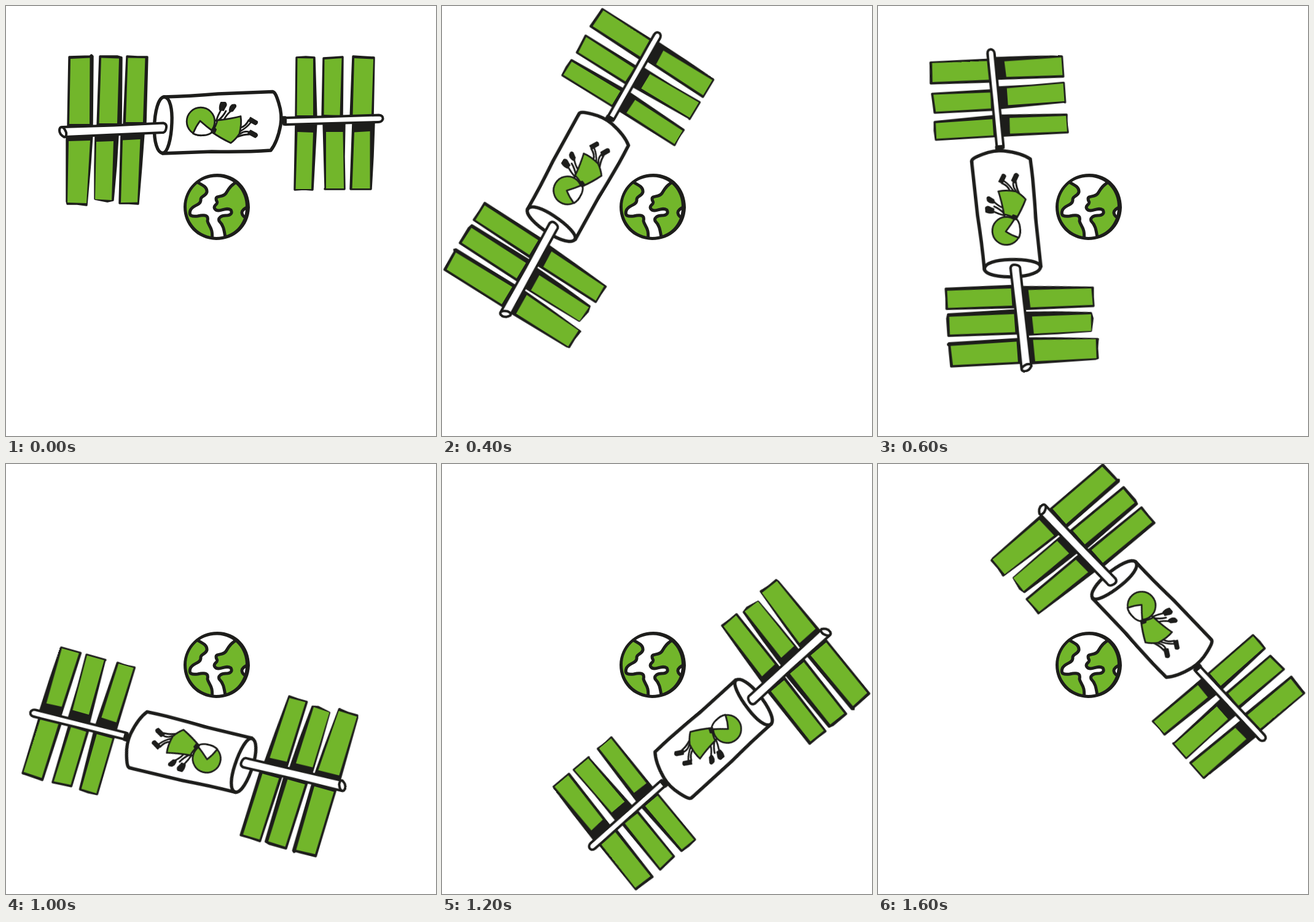
Animation, 700 px wide and 700 px high, one loop 1800 ms. Source, as an HTML page:

```html
<!DOCTYPE html>
<html lang="en">
<head>
<meta charset="utf-8">
<title>Space station in orbit</title>
<style>
  html, body { margin: 0; height: 100%; overflow: hidden; background: #fff; }
  svg { display: block; width: 100%; height: 100%; }
  .ink { fill: #1d1d1b; stroke: #1d1d1b; stroke-width: 3.4; stroke-linejoin: round; }
  .green { fill: #72b62b; }
  .white { fill: #fff; }
  .line { stroke: #1d1d1b; stroke-width: 5.4; stroke-linejoin: round; stroke-linecap: round; }
  .land { stroke-width: 5; }
  .rod { stroke-width: 4; }
  .thin { stroke-width: 2.8; }
  .small { stroke-width: 2; }
  .flat { stroke: none; }
  .none { fill: none; }
  #station {
    transform-origin: 351.5px 194.5px;
    animation: orbit 1.8s step-end infinite;
  }
  @keyframes orbit {
    0%     { transform: none; }
    11.11% { transform: translate(-74px, 19px) rotate(-25.7deg); }
    22.22% { transform: translate(-123.7px, 79.5px) rotate(-58.9deg); }
    33.33% { transform: translate(-138.5px, 136.7px) rotate(-94deg); }
    44.44% { transform: translate(-87.5px, 240px) rotate(-139.1deg); }
    55.55% { transform: translate(-56.3px, 269.5px) rotate(-164.3deg); }
    66.66% { transform: translate(82.2px, 254px) rotate(-220.1deg); }
    77.77% { transform: translate(164.3px, 190px) rotate(-258.5deg); }
    88.88% { transform: translate(95.6px, 66.3px) rotate(-311.5deg); }
  }
</style>
</head>
<body>
<svg viewBox="0 0 700 700">
  <defs>
    <clipPath id="disc"><circle cx="343" cy="327" r="52"/></clipPath>
  </defs>

  <g id="earth">
    <circle class="white" cx="343" cy="327" r="52"/>
    <g class="green line land" clip-path="url(#disc)">
      <path d="M309 285C317 291 328 293 327 303C325 310 316 309 317 317C316 325 303 324 300 333C297 342 303 343 312 342C325 339 330 341 328 350C330 359 338 361 335 382L270 382V285Z"/>
      <path d="M377 286C367 290 362 298 358 305C353 312 342 308 342 314C342 319 347 319 341 324C337 328 340 333 346 333C354 332 360 328 366 332C369 337 366 341 358 341C350 341 345 345 347 350C355 358 355 366 358 382H420V286Z"/>
      <path class="white" d="M396 326C387 330 383.500 333 384 337C384.500 342 389 345 396 348Z"/>
    </g>
    <path class="ink flat" fill-rule="evenodd" d="M344 273C375 273 397 297 397 328C396 360 372 381 342 381C311 380 289 357 289 327C290 296 314 273 344 273ZM344 278.500C315 278 294 300 294 327C294 354 315 375 342 376C370 376 390 355 390 328C391 301 371 279 344 278.500Z"/>
  </g>

  <g id="station">
    <!-- solar panels -->
    <path class="ink" d="M103 83L137 82L139 80L141 82L140 196H101Z
      M153 82L181 82L188 84L187 195H149Z
      M197 82L214 83L230 83L227 192H192Z
      M99 210H140L137 255L131 324L116 322L100 322L99 318Z
      M146 210H182L179 260L174 316L165 318L145 314L145 260Z
      M188 208H224L220 262L215 322L200 321L185 321Z
      M473 84L488 83L502 84L505 182H472Z
      M517 85L534 84L548 83L547 182H515Z
      M565 82L580 83L599 84L597 182H561Z
      M472 190H505L502 245L499 299L485 298L470 299Z
      M517 190H551L550 245L551 298L535 298L519 298L520 296Z
      M565 190H599L597 245L594 298L578 298L561 298Z"/>
    <path class="green" d="M105 86L136.500 84.500L136 192L103 192Z
      M155 84.500L184 85.500L181 191L151.500 191Z
      M198.500 84.500L226.500 85L223 189L195 189Z
      M102 220L137 219L131 321L100 320Z
      M147 221L175 220L172 316L145 314.500Z
      M190 218.500L218.500 217L214 319.500L187 320Z
      M474.500 85L500 85.500L500 178L473.500 178Z
      M518.500 87L546.500 85L543.500 178L517.500 177Z
      M567 85L598 86.500L595 177L564.500 177Z
      M474.500 205L500 206L497 298L471.500 298Z
      M521 205L548.500 205L550 297L521 297Z
      M567 205.500L592.500 204L592.500 297L563.500 297Z"/>

    <!-- right rod -->
    <path class="ink" d="M450 181L455 181V193H452Z"/>
    <path class="white line rod" d="M455 182L530 180L607 177.500Q614 178 613.500 184Q612 189 606 189L530 191L455 193Z"/>

    <!-- module -->
    <path class="white line" d="M257 148Q300 147 345 143L434 139.500C438 140 441 148 444 158Q450 177 447 194Q442 221 431 235Q390 238 335 237L255 240Z"/>
    <path class="white line" d="M258 148C267 149 271 168 270 190C269 217 263 239 255 239.500C246 239 241 220 241.500 198C242 172 248 148 258 148Z"/>

    <!-- left rod -->
    <path class="white line rod" d="M92 197L175 194.500L256 190.500Q262 192 261 198Q260 205 256 206L175 209.500L97 213Z"/>
    <path class="white line rod" d="M91 197Q95 198 98 206Q99 213 95 213.500Q87 209 87 203Q87 197 91 197Z"/>

    <!-- astronaut -->
    <g class="line thin">
      <path class="none" d="M342 187Q345 178 350 169M355 185Q358 178 366 171M346 186Q354 179 358 171M382 198Q390 196 395 186M381 204Q392 198 398 190M381 208Q388 203 396 205M377 213Q386 209 396 209"/>
      <circle class="green" cx="317" cy="188" r="22.800"/>
      <path class="white" d="M316 187Q326 196 337 204Q331 210.500 321 210.500Q311 211 304.500 207.500Q309 196 316 187Z"/>
      <path class="green" d="M335 205Q342 196 344 186Q365 184 382 179.500Q384 192 380 208Q374 217 366 223Q349 215 335 205Z"/>
    </g>
    <path class="ink small" d="M350 157L357 157Q361 160 356 166L354 170L348 169Q347 163 350 157Z
      M368 161Q375 159 374 164L369 171L364 172Q363 165 368 161Z
      M398 181.500L409 188Q410 191 406 193L395 187Z
      M398 202.500L408 208Q411 211 406 214L394 207.500Z
      M334 205L339 198L342 201L339 208Z"/>
  </g>
</svg>
</body>
</html>
```
